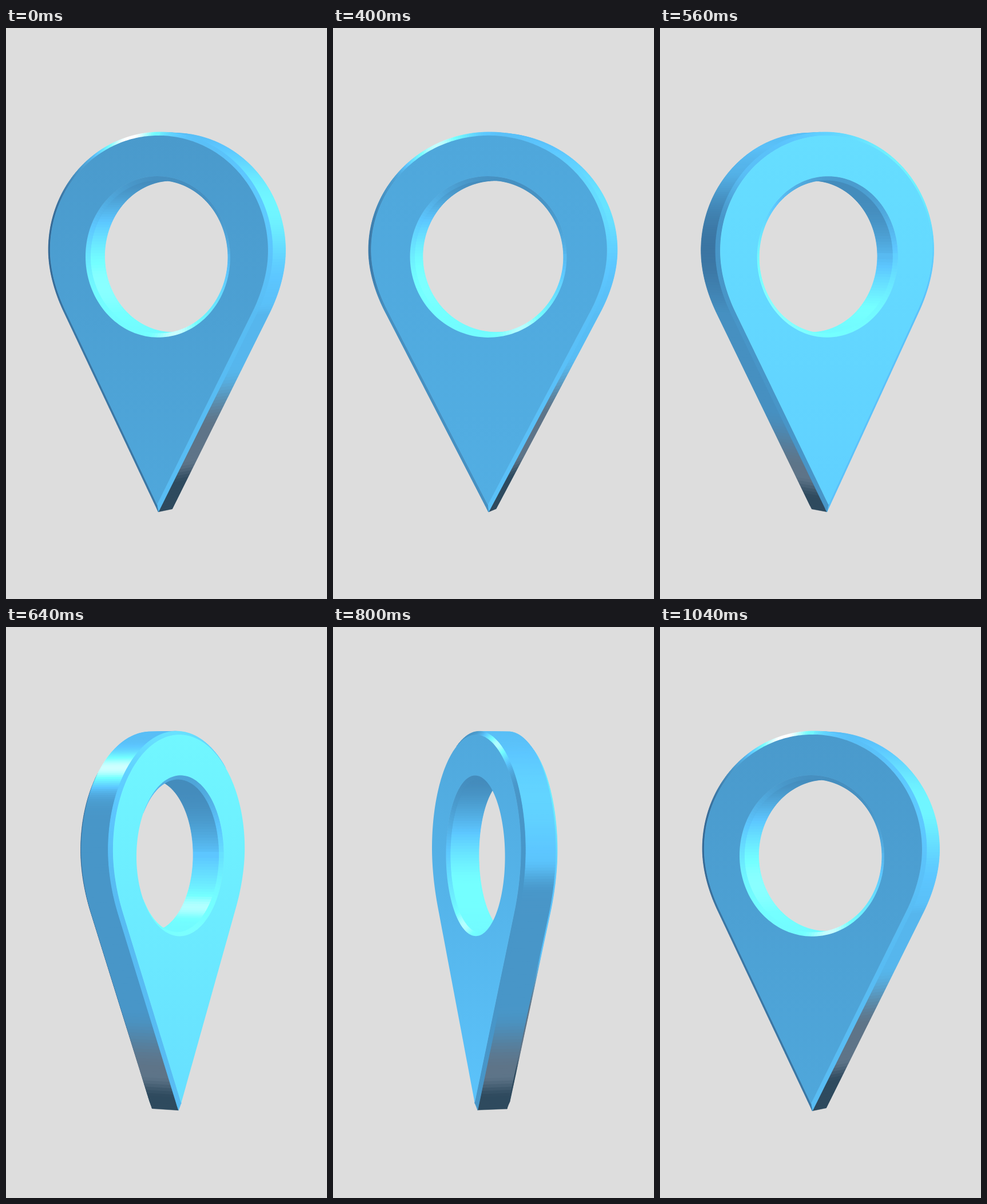
Recreate the animation shown at these times as an HTML page with a canvas. Size 561 px wide and 998 px high, loop 2.04 s.

```html
<!DOCTYPE html>
<html lang="en">
<head>
<meta charset="utf-8">
<title>Turning map pin</title>
<style>
  html, body { margin: 0; width: 100%; height: 100%; overflow: hidden; background: #ddd; }
  canvas { display: block; }
</style>
</head>
<body>
<canvas id="stage" width="561" height="998"></canvas>
<script>
const ctx = document.getElementById('stage').getContext('2d');

// Timing
const LOOP = 2040, START = 320, STEP = 40, STEPS = 19;
const REST_ANGLE = -26;

// Camera and solid
const AXIS_X = 278.4, HORIZON = 340, DISTANCE = 5000;
const RIM_Z = 27.5, FACE_Z = 33, BEVEL = 6;
const HEAD_Y = 388, HEAD_RX = 217, HEAD_RY = 205.2;
const SHOULDER = [186.5, 497], TIP = [0, 843.2];
const HOLE_Y = 399.6, HOLE_R = 133.3, HOLE_EDGE_R = 140;

const GREY = [94, 116, 136], DARK = [46, 74, 94];

const clamp = (v, lo, hi) => Math.min(hi, Math.max(lo, v));
const mix = (a, b, k) => a.map((v, i) => v + (b[i] - v) * k);
const rgb = c => `rgb(${c.map(Math.round).join()})`;
const dot = (a, b) => a.reduce((sum, v, i) => sum + v * b[i], 0);
const unit = v => { const l = Math.hypot(...v) || 1; return v.map(c => c / l); };
const normal = (a, b) => unit([b[1] - a[1], a[0] - b[0]]);
const smooth = (lo, hi, v) => {
  const k = clamp((v - lo) / (hi - lo), 0, 1);
  return k * k * (3 - 2 * k);
};

// Right half of the pin: round head, shoulder curve, straight side
function halfOutline() {
  const points = [];
  for (let i = 0; i < 80; i++) {
    const a = i / 80 * Math.PI / 2;
    points.push([HEAD_RX * Math.sin(a), HEAD_Y - HEAD_RY * Math.cos(a)]);
  }
  const top = [HEAD_RX, HEAD_Y], bend = [HEAD_RX, HEAD_Y + 40];
  const lean = mix(SHOULDER, TIP, -0.087);
  for (let i = 0; i < 24; i++) {
    const t = i / 24;
    const p = mix(top, bend, t), q = mix(bend, lean, t), r = mix(lean, SHOULDER, t);
    points.push(mix(mix(p, q, t), mix(q, r, t), t));
  }
  for (let i = 0; i <= 60; i++) points.push(mix(SHOULDER, TIP, i / 60));
  return points;
}

function inset(half) {
  const tip = [0, TIP[1] - BEVEL / normal(SHOULDER, TIP)[1]];
  return half.map((p, i) => {
    if (i === 0) return [0, p[1] + BEVEL];
    if (i === half.length - 1) return tip;
    const [nx, ny] = normal(half[i - 1], half[i + 1]);
    const q = [p[0] - nx * BEVEL, p[1] - ny * BEVEL];
    return q[0] < 0 ? tip : q;
  });
}

const mirrored = half =>
  half.concat(half.slice(1, -1).reverse().map(([x, y]) => [-x, y]));
const circle = r => Array.from({ length: 160 }, (_, i) => {
  const a = -i / 160 * Math.PI * 2;
  return [r * Math.cos(a), HOLE_Y + r * Math.sin(a)];
});

const half = halfOutline();
const rim = mirrored(half), faceEdge = mirrored(inset(half));
const holeWall = circle(HOLE_R), holeEdge = circle(HOLE_EDGE_R);

// Lights: a broad one from the right and a sharp one from the upper left
const KEY = unit([0.75, 0.4, 0.55]);
const GLINT = unit([-0.48, 0.68, 0.55]);
const keyLight = n => Math.max(0, dot(n, KEY)) ** 8;
const glintLight = n => Math.max(0, dot(n, GLINT)) ** 50;

// Brightness to blue: 0 is deep, 0.6 is sky, 1 is cyan, above that white
const blue = level => [
  58 + 60 * level + 350 * Math.max(0, level - 0.98),
  115 + 145 * level,
  160 + 165 * level
].map(c => clamp(c, 0, 255));

function innerColor(n) {
  const level = 0.17 + 0.77 * smooth(-1, 0.6, 0.35 * n[0] + n[1]);
  return blue(level + 0.1 * keyLight(n) + 0.25 * glintLight(n));
}

function outerColor(n, y, slope) {
  const [nx, ny] = n;
  const lift = ny > 0 ? 0.7 : slope ? 0.2 : 1.4;
  const lit = smooth(-0.15, 0.25, nx + ny * lift);
  const color = blue(0.24 + 0.28 * lit + 0.43 * keyLight(n) + glintLight(n)
    - 0.3 * smooth(0.72, 0.95, -nx));
  if (slope > 0) return color;
  // The side reflects dark ground towards the tip
  const side = Math.max(0, nx - 0.55);
  const grey = mix(color, GREY, smooth(660, 770, y + 300 * side));
  return mix(grey, DARK, smooth(780, 822, y + 110 * side));
}

function faceLevel(n) {
  const nx = n[0];
  return 0.27 + 0.22 * nx * nx + 0.33 * smooth(-0.4, 0.05, nx)
    + 0.15 * keyLight(n) - 0.35 * smooth(0.83, 1, nx);
}

function draw(degrees) {
  const angle = degrees * Math.PI / 180;
  const c = Math.cos(angle), s = Math.sin(angle);
  const turn = (x, z) => [x * c + z * s, z * c - x * s];
  const project = (ring, z0) => ring.map(([px, py]) => {
    const [x, z] = turn(px, z0);
    const k = DISTANCE / (DISTANCE - z);
    return [AXIS_X + x * k, HORIZON + (py - HORIZON) * k];
  });
  const trace = points => {
    points.forEach(([x, y], i) => i ? ctx.lineTo(x, y) : ctx.moveTo(x, y));
    ctx.closePath();
  };
  const area = points => points.reduce((sum, p, i) => {
    const q = points[(i + 1) % points.length];
    return sum + p[0] * q[1] - q[0] * p[1];
  }, 0);

  // Band between two rings; slope tilts it to the front (1) or back (-1)
  function band(near, nearZ, far, farZ, slope, color) {
    const a = project(near, nearZ), b = project(far, farZ);
    const shape = slope < 0 ? near : far;
    for (let i = 0; i < a.length; i++) {
      const j = (i + 1) % a.length, k = (i + 2) % a.length;
      if (area([a[i], a[j], b[j], b[i]]) >= 0) continue;
      const [wx, wy] = normal(shape[i], shape[j]);
      const [ox, oy, oz] = unit([wx, -wy, slope]);
      const [nx, nz] = turn(ox, oz);
      const y = (shape[i][1] + shape[j][1]) / 2;
      ctx.fillStyle = ctx.strokeStyle = rgb(color([nx, oy, nz], y, slope));
      // Reach under the next piece so that no seam shows
      ctx.beginPath();
      trace([a[i], a[j], a[k], b[k], b[j], b[i]]);
      ctx.fill();
      ctx.stroke();
    }
  }

  ctx.fillStyle = '#ddd';
  ctx.fillRect(0, 0, 561, 998);
  ctx.lineWidth = 0.5;
  ctx.lineJoin = 'round';

  band(holeWall, RIM_Z, holeWall, -RIM_Z, 0, innerColor);
  band(holeEdge, FACE_Z, holeWall, RIM_Z, 1, innerColor);
  band(rim, -RIM_Z, faceEdge, -FACE_Z, -1, outerColor);
  band(rim, RIM_Z, rim, -RIM_Z, 0, outerColor);
  band(faceEdge, FACE_Z, rim, RIM_Z, 1, outerColor);

  const level = faceLevel([s, 0, c]);
  const fill = ctx.createLinearGradient(0, 190, 0, 835);
  fill.addColorStop(0, rgb(blue(level + 0.1 * s)));
  fill.addColorStop(1, rgb(blue(level - 0.1 * s)));
  ctx.fillStyle = fill;
  ctx.beginPath();
  trace(project(faceEdge, FACE_Z));
  trace(project(holeEdge, FACE_Z));
  ctx.fill('evenodd');
}

// Half a turn with a sine ease; both sides of the pin look alike
function angleAt(step) {
  if (step <= 0 || step >= STEPS) return REST_ANGLE;
  const eased = (1 - Math.cos(Math.PI * (step + 0.3) / 19.6)) / 2;
  const angle = REST_ANGLE + 180 * eased;
  return angle > 90 ? angle - 180 : angle;
}

const begin = performance.now();
let shown = -1;
function tick() {
  const time = Math.max(0, performance.now() - begin) % LOOP;
  const step = clamp(Math.floor((time - START) / STEP) + 1, 0, STEPS);
  if (step !== shown) {
    shown = step;
    draw(angleAt(step));
  }
  requestAnimationFrame(tick);
}
tick();
</script>
</body>
</html>
```
